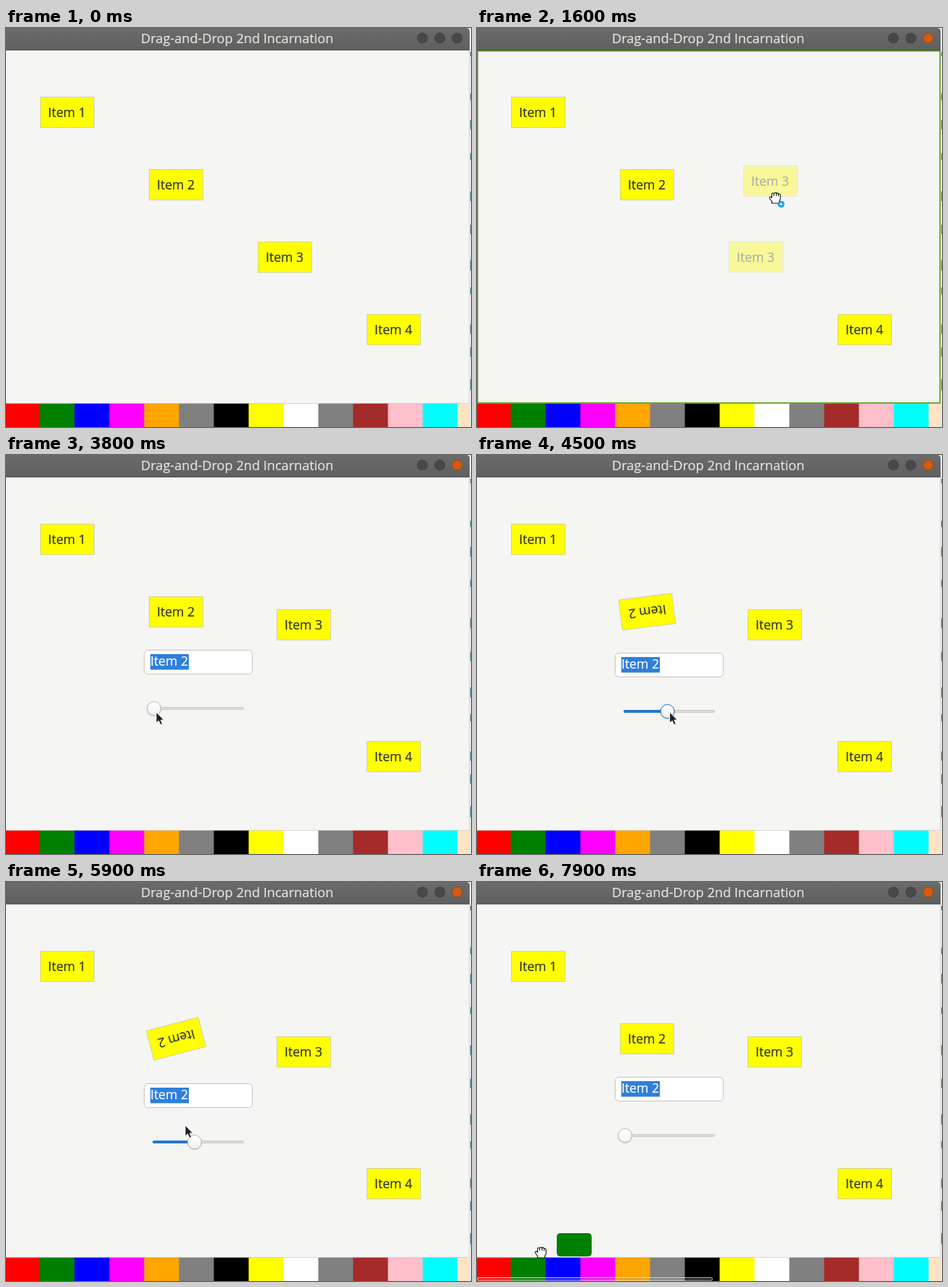
An HTML page that plays this animation: 641x551 px, repeating every 8 s.

```html
<!DOCTYPE html>
<html lang="en">
<head>
<meta charset="utf-8">
<title>Drag and drop</title>
<style>
  html, body { margin: 0; width: 100%; height: 100%; overflow: hidden; background: #f5f5f4; }
  svg { display: block; }
  text { font: 17.6px "Open Sans", "Noto Sans", sans-serif; fill: #2e3436; stroke: #2e3436; stroke-width: .2; }
  text.light { fill: #fff; stroke: #fff; }
  text.title { font-size: 18.15px; fill: #e6e3dc; stroke: #e6e3dc; }
</style>
</head>
<body>
<svg width="641" height="551" viewBox="0 0 641 551">
  <defs>
    <linearGradient id="bar" x2="0" y2="1">
      <stop offset="0" stop-color="#6b6b6b"/><stop offset="1" stop-color="#5f5f5f"/>
    </linearGradient>
    <linearGradient id="knobFill" x2="0" y2="1">
      <stop offset="0" stop-color="#fff"/><stop offset="1" stop-color="#f4f3f2"/>
    </linearGradient>
  </defs>
  <rect width="641" height="551" fill="#f5f5f4"/>
  <g id="edge"><path d="M639 0V551" stroke="#c9c9c9"/></g>
  <path d="M0 0H634Q639 0 639 5V31H0Z" fill="url(#bar)"/>
  <path d="M0 30.5H639" stroke="#585858"/>
  <text class="title" x="318.7" y="20.6" text-anchor="middle">Drag-and-Drop 2nd Incarnation</text>
  <g id="buttons" stroke="#414141"></g>
  <g id="palette"><path d="M0 518.5H639" stroke="#cdc7c2"/></g>
  <rect id="scroll" x=".5" y="546.5" width="324" height="3.5" rx="1.7" fill="#666" fill-opacity=".2" stroke="#fff" stroke-opacity=".75"/>
  <g id="items"></g>
  <g id="editor">
    <rect x="190.5" y="269.5" width="149" height="33" rx="5" fill="#fff" stroke="#c8c3bd"/>
    <rect x="199" y="275" width="53" height="21.5" fill="#2f7fdb"/>
    <text class="light" x="199" y="291.4">Item 2</text>
    <rect x="202.5" y="348.5" width="125" height="3" rx="1.5" fill="#dedad6" stroke="#cfcac5"/>
    <rect id="fill" x="202" y="348" height="4" rx="2" fill="#2478d2"/>
    <g id="knob">
      <circle cy="1" r="10.3" fill="#000" fill-opacity=".12"/>
      <circle id="ring" r="9.5" fill="url(#knobFill)"/>
    </g>
  </g>
  <rect id="drop" x=".75" y="31.75" width="637.5" height="486" fill="none" stroke="#4e9a06" stroke-width="1.5"/>
  <rect id="chip" width="47" height="31" rx="4" fill="#008000" stroke="#006a00"/>
  <g id="pointer">
    <path id="arrow" d="M0 0V15.2L3.5 12L6 17.6L8.7 16.4L6.3 11H10.8Z" fill="#202024" stroke="#fff"/>
    <g id="hand" stroke="#111" stroke-width="1.1" stroke-linejoin="round">
      <path d="M-4.5 10V7.5L-7.5 3.5C-8.6 1.7-6.6.3-5.2 1.7L-4.5 2.5V-2.5C-4.3-4.5-1.9-4.5-1.6-2.9C-1.3-5.1 1.3-5.1 1.6-3.1C2-4.7 4.4-4.5 4.5-2.3C5.2-3.5 7.2-2.9 7.2-.9V4L5.6 7.5V10Z" fill="#fff"/>
      <path d="M-1.6-2.9V0M1.6-3.1V0M4.5-2.3V.3"/>
    </g>
    <g id="badge">
      <circle cx="8.3" cy="11.3" r="4.6" fill="#159fdf"/>
      <path d="M6 11.3H10.6M8.3 9V13.6" stroke="#fff" stroke-width="1.2"/>
    </g>
  </g>
</svg>
<script>
const LOOP = 8000, STEP = 100;
const ITEM_W = 75, ITEM_H = 43;
const SLIDER_X = 204, SLIDER_LEN = 122;
const $ = id => document.getElementById(id);

function add(parent, tag, attrs, text = "") {
  const el = document.createElementNS("http://www.w3.org/2000/svg", tag);
  set(el, attrs);
  el.textContent = text;
  return parent.appendChild(el);
}
function set(el, attrs) {
  for (const k in attrs) el.setAttribute(k, attrs[k]);
}
const show = (el, on) => { el.style.display = on ? "" : "none"; };
const between = (t, a, b) => t >= a && t < b;
const ramp = (t, a, b) => Math.min(1, Math.max(0, (t - a) / (b - a)));

// Slider: accelerates to the end, comes back half way, later returns to zero
const knobAt = t => SLIDER_X
  + SLIDER_LEN * ramp(t, 3900, 4800) ** 1.81
  - 66 * ramp(t, 4800, 5500)
  - 56 * ramp(t, 6200, 6600);

// Each move pulls the pointer from wherever it is to its goal
function pointerAt(t, knobX) {
  let x = 641, y = 440;
  const move = (a, b, toX, toY) => {
    const u = ramp(t, a, b);
    x += (toX - x) * u;
    y += (toY - y) * u;
  };
  const grabKnob = (a, b) => move(a, b, knobX + 3, 355);
  move(500, 1100, 391, 337);
  move(1200, 1600, 411, 232);
  move(1700, 2100, 417, 255);
  move(2100, 2700, 249, 216);
  move(3000, 3500, 214, 322);
  grabKnob(3600, 3800);
  move(5600, 5900, 247, 336);
  grabKnob(5900, 6200);
  move(6600, 7000, 177, 377);
  move(7000, 7400, 117, 493);
  move(7400, 7700, 74, 526);
  move(7700, 7900, 88, 509);
  return [x, y];
}

const colors = ["red", "green", "blue", "magenta", "orange", "gray", "black",
  "yellow", "white", "gray", "brown", "pink", "cyan", "bisque"];
colors.forEach((fill, i) => add($("palette"), "rect",
  { x: 48 * i - 1.5, y: 518.7, width: i < 13 ? 48.5 : 16.5, height: 33, fill }));

// Sliver of text in the window behind
let seed = 7;
const random = () => (seed = seed * 16807 % 2147483647) / 2147483647;
for (let y = 33; y < 515; y += 30 + 30 * random())
  add($("edge"), "rect", { x: 640, y, width: 1, height: 6 + 10 * random(), fill: "#3f7384" });

const buttons = [0, 1, 2].map(i =>
  add($("buttons"), "circle", { cx: 574 + 24 * i, cy: 14, r: 7, fill: "#484848" }));

function makeItem(n) {
  const g = add($("items"), "g", {});
  add(g, "rect", { x: -37, y: -21, width: ITEM_W - 1, height: ITEM_H - 1,
    fill: "#ff0", stroke: "#c4beb9", "stroke-opacity": .65 });
  add(g, "text", { x: -.4, y: 6.2, "text-anchor": "middle" }, "Item " + n);
  return g;
}
function place(el, x, y, angle = 0, opacity = 1) {
  set(el, { transform: `translate(${x + ITEM_W / 2} ${y + ITEM_H / 2}) rotate(${angle})`, opacity });
}
const items = [1, 2, 3, 4].map(makeItem), ghost = makeItem(3);
items.forEach((item, i) => place(item, 47 + 150 * i, 95 + 100 * i));

function render(time) {
  const t = Math.floor(time / STEP) * STEP;
  const knobX = knobAt(t);
  const [x, y] = pointerAt(t, knobX);
  const active = t >= 600, dragging = between(t, 1300, 2100), swatch = t >= 7800;

  set(buttons[2], { fill: active ? "#d65a0c" : "#484848", stroke: active ? "#8a4a22" : "#414141" });

  show($("drop"), dragging);
  show(ghost, dragging);
  place(ghost, x - 44, y - 42, 0, .36);
  if (t < 2100) place(items[2], 347, 295, 0, dragging ? .36 : 1);
  else place(items[2], 373, 213);

  const turn = (knobX - SLIDER_X) / SLIDER_LEN, rad = turn * 2 * Math.PI;
  place(items[1], 197, 195, turn * 360);

  // The editor sits below the rotated item's bounding box
  const height = ITEM_W * Math.abs(Math.sin(rad)) + ITEM_H * Math.abs(Math.cos(rad));
  const held = between(t, 3900, 5600) || between(t, 6200, 6700);
  show($("editor"), t >= 2900);
  set($("editor"), { transform: `translate(0 ${Math.round((height - ITEM_H) / 2 - .1)})` });
  set($("fill"), { width: knobX - SLIDER_X });
  set($("knob"), { transform: `translate(${knobX} 350)` });
  set($("ring"), { stroke: held ? "#1b6acb" : "#bdb7b0" });

  show($("scroll"), t >= 7600);
  show($("chip"), swatch);
  set($("chip"), { x: x + 22.5, y: y - 23.5 });

  show($("pointer"), active);
  show($("arrow"), !dragging && !swatch);
  show($("hand"), dragging || swatch);
  show($("badge"), dragging);
  set($("pointer"), { transform: `translate(${x} ${y})` });
}

const start = performance.now();
function tick() {
  render((performance.now() - start) % LOOP);
  requestAnimationFrame(tick);
}
tick();
</script>
</body>
</html>
```
